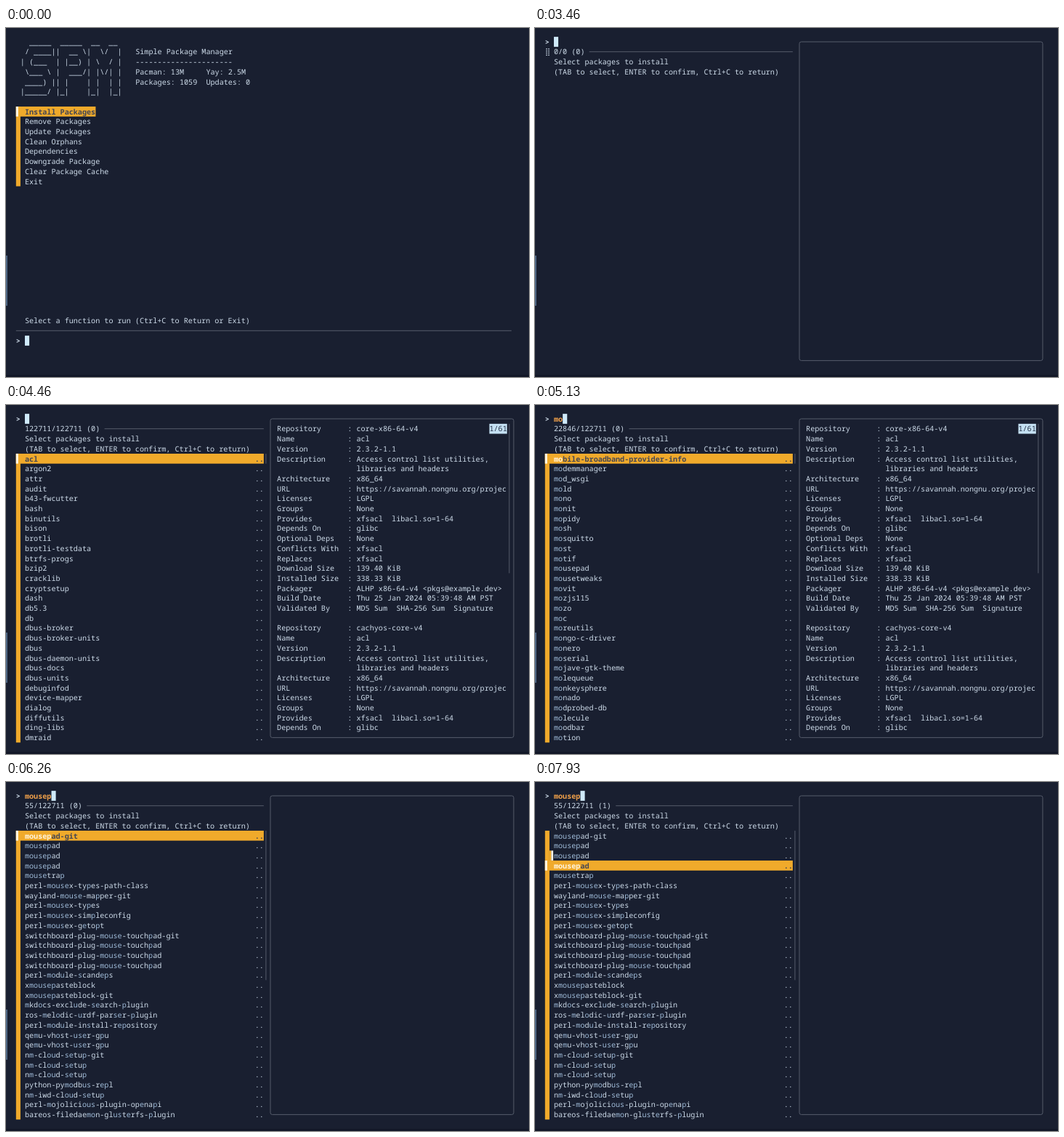
Animation, 720 px wide and 480 px high, one loop 8 s. Source, as an HTML page:

```html
<!DOCTYPE html>
<html lang="en">
<head>
<meta charset="utf-8">
<title>Simple Package Manager</title>
<style>
html, body { margin: 0; width: 100%; height: 100%; overflow: hidden; background: #191f30; }
svg { display: block; width: 720px; height: 480px; }
text {
  font: 10.15px "Noto Sans Mono", "DejaVu Sans Mono", monospace;
  fill: #cedcea; white-space: pre; text-rendering: geometricPrecision;
}
.bold { font-weight: 700; }
.query { font-weight: 700; fill: #efa04a; }
.match { fill: #9fbbd8; }
.current { font-weight: 700; fill: #444653; }
.current .match { fill: #fff4dc; }
.badge { fill: #26344a; }
.line { fill: none; stroke: #555c6b; stroke-width: 1; }
</style>
</head>
<body>
<svg viewBox="0 0 720 480">
  <rect width="720" height="480" fill="#191f30"/>
  <rect y="477" width="720" height="3" fill="#121727"/>
  <rect y="313" width="2" height="69" fill="#4d6583"/>
  <g id="screen"></g>
</svg>
<script>
const LOOP = 8000, TOTAL = 122711;
const CELL = 6.09, ROW = 13.7, LEFT = 13.8, TOP = 12.15;
const ORANGE = '#f0aa2b', PALE = '#cfeafa', CREAM = '#fff8e8';
const LIST_TOP = 4, LIST_ROWS = 29;

const col = c => LEFT + c * CELL;
const row = r => TOP + r * ROW;
const escapeText = s => s.replace(/&/g, '&amp;').replace(/</g, '&lt;').replace(/>/g, '&gt;');

const markup = (c, r, body, cls = '') =>
  `<text x="${col(c).toFixed(2)}" y="${(row(r) + 10.55).toFixed(2)}" class="${cls}">${body}</text>`;
const text = (c, r, s, cls) => markup(c, r, escapeText(s), cls);
const lines = (c, r, list) => list.map((s, i) => s && text(c, r + i, s)).join('');
const block = (c, r, w, h, fill) =>
  `<rect x="${col(c)}" y="${row(r)}" width="${w * CELL}" height="${h * ROW}" fill="${fill}"/>`;
const rule = (from, to, r) => `<path class="line" d="M${col(from)} ${row(r + .5)}H${col(to)}"/>`;
const bar = (c, r, h) => `<path class="line" d="M${col(c + .5)} ${row(r)}v${h * ROW}"/>`;
const cursor = (c, r, on) => on ? block(c, r, 1, 1, PALE) : '';

const LOGO = [
  '   _____  _____  __  __',
  '  / ____||  __ \\|  \\/  |',
  ' | (___  | |__) | \\  / |',
  '  \\___ \\ |  ___/| |\\/| |',
  '  ____) || |    | |  | |',
  ' |_____/ |_|    |_|  |_|'
];
const SUMMARY = [
  'Simple Package Manager', '-'.repeat(22),
  'Pacman: 13M     Yay: 2.5M', 'Packages: 1059  Updates: 0'
];
const MENU = ['Install Packages', 'Remove Packages', 'Update Packages', 'Clean Orphans',
  'Dependencies', 'Downgrade Package', 'Clear Package Cache', 'Exit'];

const words = s => s.trim().split(/\s+/);
const ALL = words(`acl argon2 attr audit b43-fwcutter bash binutils bison brotli brotli-testdata
  btrfs-progs bzip2 cracklib cryptsetup dash db5.3 db dbus-broker dbus-broker-units dbus
  dbus-daemon-units dbus-docs dbus-units debuginfod device-mapper dialog diffutils ding-libs dmraid`);
const M = words(`m4 make man-db man-pages mdadm mkinitcpio mpfr mtools mc mdds mesa meson mpc mpd mpv
  mtr mutt mypy mako maim mame mapnik mariadb marisa matio maven mbedtls mediainfo memcached`);
const MO = words(`mobile-broadband-provider-info modemmanager mod_wsgi mold mono monit mopidy
  mosh mosquitto most motif mousepad mousetweaks movit mozjs115 mozo moc moreutils mongo-c-driver
  monero moserial mojave-gtk-theme molequeue monkeysphere monado modprobed-db molecule moodbar motion`);
const MOUS = words(`mousai mousai-git mousam mouse-actions-cli-bin mouse-actions-gui-bin
  mouse-configurator mouseless-bin mouselogger-git mouse_m908 mousemode-git mousepad-git mousetrap
  mousetweaks mousetweaks mousetweaks mousepad mousepad mousepad asn1c-mouse07410-git
  dualscreen-mouse-utils fancy-mouse-boot-rom lan-mouse-bin lan-mouse-git necta-wifi-mouse
  perl-mousex-configfromfile perl-mousex-getopt perl-mousex-simpleconfig perl-mousex-types
  perl-mousex-types-path-class`);
const MOU = ['mount-zip', 'mountpoint-git', ...MOUS.slice(0, 27)];
const MOUSE = [...MOUS.filter(s => s.includes('mouse')), 'wayland-mouse-mapper-git', 'xmousepasteblock'];
const MOUSEP = words(`mousepad-git mousepad mousepad mousepad mousetrap perl-mousex-types-path-class
  wayland-mouse-mapper-git perl-mousex-types perl-mousex-simpleconfig perl-mousex-getopt
  switchboard-plug-mouse-touchpad-git switchboard-plug-mouse-touchpad switchboard-plug-mouse-touchpad
  switchboard-plug-mouse-touchpad perl-module-scandeps xmousepasteblock xmousepasteblock-git
  mkdocs-exclude-search-plugin ros-melodic-urdf-parser-plugin perl-module-install-repository
  qemu-vhost-user-gpu qemu-vhost-user-gpu nm-cloud-setup-git nm-cloud-setup nm-cloud-setup
  python-pymodbus-repl nm-iwd-cloud-setup perl-mojolicious-plugin-openapi
  bareos-filedaemon-glusterfs-plugin`);

// Keystrokes: start time, query, match count, visible items
const QUERIES = [
  [0, '', TOTAL, ALL], [4860, 'm', 57318, M], [5060, 'mo', 22846, MO], [5260, 'mou', 4127, MOU],
  [5460, 'mous', 1167, MOUS], [6060, 'mouse', 874, MOUSE], [6260, 'mousep', 55, MOUSEP]
];

const fields = list => list.flatMap(([label, ...values]) =>
  values.map((v, i) => i ? ' '.repeat(18) + v : label.padEnd(16) + ': ' + v));
const aclInfo = repo => fields([
  ['Repository', repo], ['Name', 'acl'], ['Version', '2.3.2-1.1'],
  ['Description', 'Access control list utilities,', 'libraries and headers'],
  ['Architecture', 'x86_64'], ['URL', 'https://savannah.nongnu.org/projec'], ['Licenses', 'LGPL'],
  ['Groups', 'None'], ['Provides', 'xfsacl  libacl.so=1-64'], ['Depends On', 'glibc'],
  ['Optional Deps', 'None'], ['Conflicts With', 'xfsacl'], ['Replaces', 'xfsacl'],
  ['Download Size', '139.40 KiB'], ['Installed Size', '338.33 KiB'],
  ['Packager', 'ALHP x86-64-v4 <pkgs@example.dev>'],
  ['Build Date', 'Thu 25 Jan 2024 05:39:48 AM PST'],
  ['Validated By', 'MD5 Sum  SHA-256 Sum  Signature']
]);
const ACL = [...aclInfo('core-x86-64-v4'), '', ...aclInfo('cachyos-core-v4')].slice(0, 31);
const MOUSEPAD = fields([
  ['Repository', 'aur'], ['Name', 'mousepad-git'], ['Version', '0.6.1-1'],
  ['Description', 'Simple text editor for Xfce'], ['URL', 'https://gitlab.xfce.org/apps/mouse'],
  ['AUR URL', 'https://aur.archlinux.org/packages'], ['Groups', 'xfce4-goodies-git'],
  ['Licenses', 'GPL'], ['Provides', 'mousepad'], ['Depends On', 'gtksourceview4'],
  ['Make Deps', 'git  intltool  xfce4-dev-tools'], ['Check Deps', 'None'],
  ['Optional Deps', 'None'], ['Conflicts With', 'mousepad'], ['Maintainer', 'None'],
  ['Votes', '12'], ['Popularity', '0.00'], ['Out-of-date', 'No']
]);

// Earliest-ending subsequence, tightened by scanning backwards
function matchPositions(s, query) {
  const at = s.indexOf(query);
  if (at >= 0) return new Set([...query].map((_, i) => at + i));
  let end = -1;
  for (const ch of query) {
    end = s.indexOf(ch, end + 1);
    if (end < 0) return new Set();
  }
  const hits = new Set();
  for (let i = end, q = query.length - 1; q >= 0; i--) {
    if (s[i] === query[q]) { hits.add(i); q--; }
  }
  return hits;
}

function highlight(s, query) {
  const hits = matchPositions(s, query);
  let out = '', inside = false;
  [...s].forEach((ch, i) => {
    if (hits.has(i) !== inside) {
      out += inside ? '</tspan>' : '<tspan class="match">';
      inside = !inside;
    }
    out += escapeText(ch);
  });
  return inside ? out + '</tspan>' : out;
}

const pointer = (r, width) => block(0, r, width, 1, ORANGE) + block(0, r, .5, 1, CREAM);

function menuScreen(t) {
  return lines(0, 0, LOGO) + lines(27, 1, SUMMARY)
    + block(0, 7, 1, MENU.length, ORANGE) + pointer(7, 18)
    + MENU.map((s, i) => text(2, 7 + i, s, i ? '' : 'current')).join('')
    + text(2, 28, 'Select a function to run (Ctrl+C to Return or Exit)')
    + rule(0, 112, 29) + text(0, 30, '>', 'bold') + cursor(2, 30, t < 460);
}

function loadingScreen(t) {
  const on = t < 1130 || (t >= 1730 && t < 2330) || t >= 2930;
  return lines(0, 0, ['SPM - Simple Package Manager', '='.repeat(28), '',
    'Loading packages... This may take a moment.']) + cursor(0, 4, on);
}

function previewPane(t) {
  let out = `<rect class="line" x="${col(57.5)}" y="${row(.5)}" width="${55 * CELL}" height="${32 * ROW}" rx="2.5"/>`;
  if (t >= 4330 && t < 5400) {
    out += lines(59, 1, ACL) + block(107, 1, 4, 1, '#c4e0f3') + text(107, 1, '1/61', 'badge') + bar(111, 1, 15);
  } else if (t >= 7330 && t < 7860) {
    out += lines(59, 1, MOUSEPAD);
  }
  return out;
}

function listRows(t, query, items, count) {
  const marked = t >= 7730 ? 2 : -1;
  const current = t < 7330 ? 0 : t < 7530 ? 1 : t < 7730 ? 2 : 3;
  const thumb = Math.min(LIST_ROWS, Math.max(1, Math.floor(LIST_ROWS ** 2 / count)));
  let out = block(0, LIST_TOP, 1, LIST_ROWS, ORANGE) + pointer(LIST_TOP + current, 56);
  if (marked >= 0) {
    out += block(1, LIST_TOP + marked, .4, 1, ORANGE) + block(1.4, LIST_TOP + marked, .45, 1, CREAM);
  }
  items.slice(0, LIST_ROWS).forEach((s, i) => {
    const cls = i === current ? 'current' : '';
    out += markup(2, LIST_TOP + i, highlight(s, query), cls) + text(54, LIST_TOP + i, '..', cls);
  });
  return out + bar(56, LIST_TOP, thumb);
}

function finderScreen(t) {
  const [, query, matches, items] = QUERIES.filter(q => q[0] <= t).pop();
  const loaded = Math.round(TOTAL * Math.min(1, Math.max(0, (t - 3460) / 940)));
  const count = Math.min(matches, loaded);
  const info = `${count}/${loaded} (${t >= 7730 ? 1 : 0})`;
  const spinner = '⣿⣾⣽⣻⢿⡿⣟⣯⣷'[Math.floor((t - 3460) / 70) % 9];
  const on = t < 6860 || t >= 7330;
  return text(0, 0, '>', 'bold') + text(2, 0, query, 'query') + cursor(2 + query.length, 0, on)
    + (t < 4400 ? text(0, 1, spinner) : '')
    + text(2, 1, info) + rule(3 + info.length, 56, 1)
    + lines(2, 2, ['Select packages to install', '(TAB to select, ENTER to confirm, Ctrl+C to return)'])
    + (count ? listRows(t, query, items, count) : '')
    + previewPane(t);
}

const screen = document.getElementById('screen');
let shown = '';

function render(t) {
  const next = t < 600 ? menuScreen(t) : t < 3460 ? loadingScreen(t) : finderScreen(
    t < 4400 ? 3460 + Math.floor((t - 3460) / 70) * 70 : t);
  if (next !== shown) screen.innerHTML = shown = next;
}

const start = performance.now();
function tick() {
  render((performance.now() - start) % LOOP);
  requestAnimationFrame(tick);
}
tick();
</script>
</body>
</html>
```
